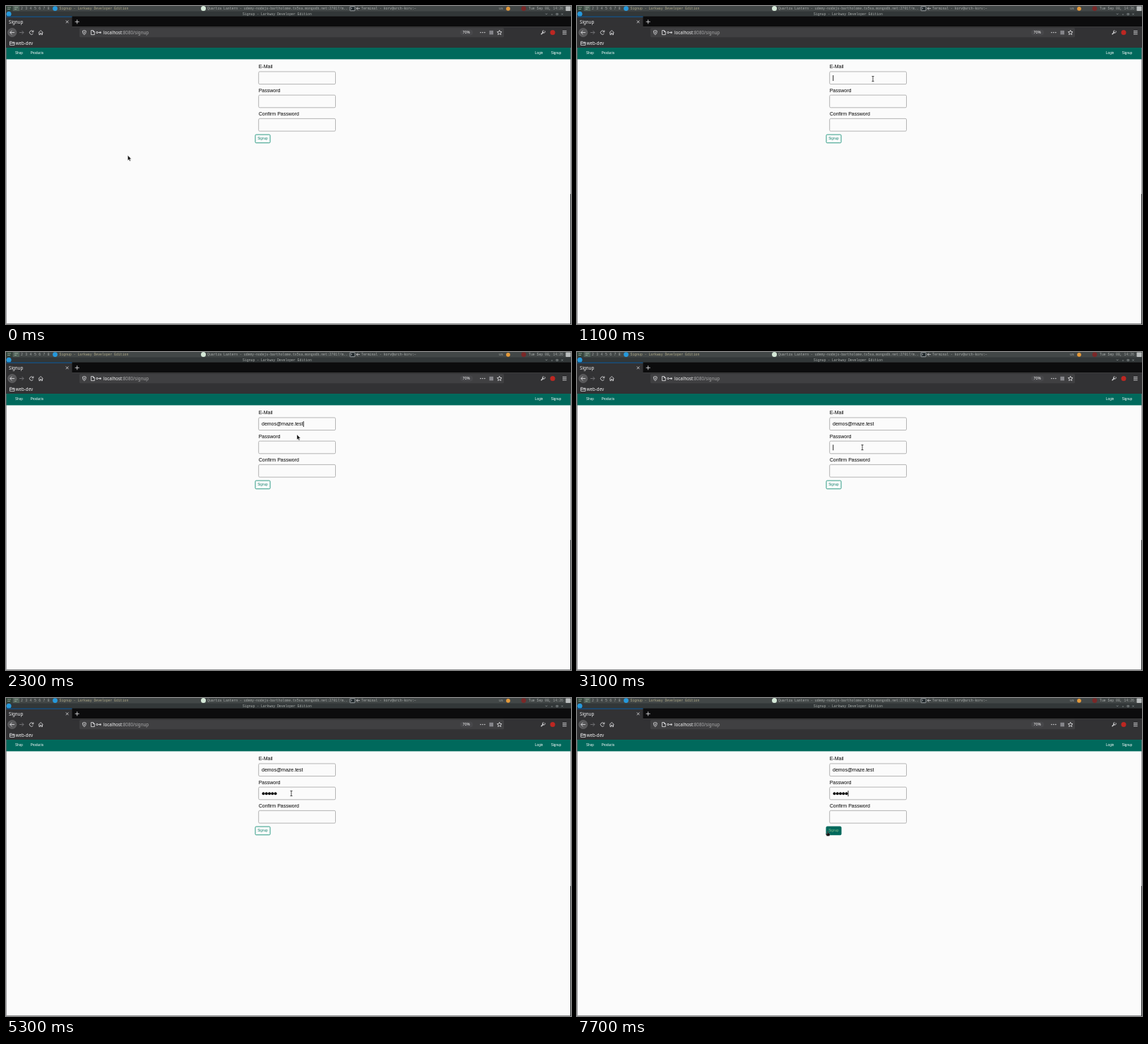
An HTML page that plays this animation: 800 px wide and 450 px high, repeating every 8000 ms.

```html
<!DOCTYPE html>
<html lang="en">
<head>
<meta charset="utf-8">
<title>Signup form</title>
<style>
  html, body { margin: 0; width: 100%; height: 100%; overflow: hidden; background: #fbfbfb; }
  svg { display: block; width: 800px; height: 450px; }
  text { white-space: pre; }
  .panel text { font: 4.8px "Liberation Mono", monospace; fill: #a9adab; }
  .panel .active { fill: #b0aa88; }
  .chrome text { font: 6.2px "Noto Sans", sans-serif; fill: #f4f4f5; }
  .nav text, .button text { font: 4.65px "Liberation Sans", sans-serif; fill: #fff; }
  .form text { font: 7px "Liberation Sans", sans-serif; fill: #000; }
  .form rect { fill: #fbfbfb; stroke: #adadad; stroke-width: .9; }
  .line { fill: none; stroke: #d5d5d7; stroke-width: .9; }
  .button rect { fill: #fbfbfb; stroke: #2f9c85; stroke-width: 1; }
  .button text { fill: #15836f; }
  .button.hover rect { fill: #00695c; stroke: #00695c; }
  .button.hover text { fill: #86bd8c; }
</style>
</head>
<body>
<svg viewBox="0 0 800 450">
  <rect width="800" height="450" fill="#fbfbfb"/>

  <g class="panel">
    <rect width="800" height="15" fill="#323738"/>
    <rect width="800" height="7.5" fill="#424747"/>
    <rect width="9" height="7" fill="#32443a"/>
    <rect x="10" width="9" height="7" fill="#52645a"/>
    <path d="M2 2H7M2 4.5H6M12 2H17M12 4.5H15" stroke="#a3b0a6" stroke-width=".8"/>
    <g id="workspaces"></g>
    <circle cx="69.5" cy="3.6" r="3.4" fill="#2599dc"/>
    <text class="active" x="75.5" y="5">Signup - Larkway Developer Edition</text>
    <circle cx="279.5" cy="3.6" r="3.5" fill="#d5e9d8"/>
    <text x="285" y="5">Quartza Lantern - udemy-nodejs-bartholome.tx5sa.mongodb.net:27017/m..</text>
    <rect x="487" y=".7" width="7" height="6" rx=".7" fill="#20282b" stroke="#c5cbcc" stroke-width=".7"/>
    <path d="M488.3 2.2L489.6 3.4L488.3 4.6" class="line"/>
    <path d="M496 3.5H501M498.5 1.5L496 3.5L498.5 5.5" class="line" style="stroke-width:.7"/>
    <text x="503" y="5">Terminal - korv@arch-korv:~</text>
    <text x="698" y="5">us</text>
    <circle cx="711" cy="3.8" r="2.9" fill="#e59a3a"/>
    <circle cx="733" cy="3.6" r="3.4" fill="#7a2828"/>
    <text x="740" y="5">Tue Sep 08, 14:26</text>
    <rect x="792.5" y=".5" width="7" height="6.5" rx=".8" fill="#b9bdbd"/>
    <circle cx="4" cy="11.3" r="3.5" fill="#2599dc"/>
    <text x="335" y="12.6">Signup - Larkway Developer Edition</text>
    <path d="M764 10.6L765.2 12L766.4 10.6M772 12H774M779 10.5H781.5V12.5H779ZM786.5 10.5L788.5 12.5M788.5 10.5L786.5 12.5" class="line" style="stroke:#979e9f;stroke-width:.7"/>
  </g>

  <g class="chrome">
    <rect y="14.7" width="800" height="15" fill="#0c0c0d"/>
    <rect y="15" width="93.5" height="15" fill="#323234"/>
    <rect y="14.7" width="93.5" height=".8" fill="#0a6fc4"/>
    <rect y="29.3" width="800" height="29.7" fill="#323234"/>
    <text x="4" y="24.5">Signup</text>
    <path class="line" d="M84.8 20.6L88.4 24.2M88.4 20.6L84.8 24.2M97.7 22.3H103.7M100.7 19.3V25.3"/>
    <circle cx="8.7" cy="37.5" r="6.1" fill="#58585a" stroke="#737375" stroke-width=".5"/>
    <path class="line" d="M12 37.5H5.8M8.4 34.8L5.7 37.5L8.4 40.2"/>
    <path class="line" style="stroke:#77777a" d="M19 37.5H25M22.5 35L25 37.5L22.5 40"/>
    <path class="line" d="M38.3 36A2.7 2.7 0 1 0 38.4 39M38.8 34.4V36.8H36.4"/>
    <path class="line" d="M45.8 37.8L49.2 34.6L52.6 37.8M46.9 37.5V40.6H48.3V38.5H50.1V40.6H51.5V37.5"/>
    <rect x="104" y="31" width="601" height="13.3" rx="1.5" fill="#404042"/>
    <path class="line" d="M108.4 35.3L110.8 34.5L113.2 35.3C113.2 38 112.6 39.6 110.8 40.6C109 39.6 108.4 38 108.4 35.3ZM110.8 36V39"/>
    <path class="line" d="M120.5 34.5H123.5L125.3 36.3V40.6H120.5ZM123.3 34.5V36.5H125.3"/>
    <path class="line" d="M130.3 37.5H134.5"/>
    <circle class="line" cx="129" cy="37.5" r="1.2"/><circle class="line" cx="133.5" cy="37.5" r="1"/>
    <text x="138" y="39.7">localhost<tspan fill="#a8a8aa">:8080/signup</tspan></text>
    <rect x="643" y="33.5" width="18" height="8" rx="4" fill="#48484b"/>
    <text x="646.5" y="39.4" style="font-size:5.2px">70%</text>
    <path d="M672 37.5H679" stroke="#d5d5d7" stroke-width="1.6" stroke-linecap="round" stroke-dasharray="0 2.9"/>
    <rect x="684.4" y="34.8" width="5.6" height="5.6" fill="#85858a"/>
    <path class="line" id="star"/>
    <path class="line" style="stroke-width:1.4" d="M757.6 40.2L761 36.8"/>
    <path class="line" d="M762.8 35.2A1.8 1.8 0 1 1 761.3 34.6"/>
    <circle cx="774" cy="37.6" r="3.5" fill="#bd2722"/>
    <path class="line" d="M788 35.4H793.7M788 37.6H793.7M788 39.8H793.7"/>
    <path class="line" d="M5.4 50.3H8L8.8 51.2H12V55.3H5.4ZM5.4 52.5H12"/>
    <text x="13.7" y="54.8">web-dev</text>
  </g>

  <g class="nav">
    <rect y="59" width="800" height="16.4" fill="#00695c"/>
    <text x="13" y="68.4">Shop</text>
    <text x="34.7" y="68.4">Products</text>
    <text x="749" y="68.4">Login</text>
    <text x="771.7" y="68.4">Signup</text>
  </g>

  <g class="form">
    <g id="fields"></g>
    <text id="email" x="362" y="104"></text>
    <g id="dots"></g>
  </g>
  <g class="button" id="button">
    <rect x="353" y="182" width="21" height="11.7" rx="1.2"/>
    <text x="356.2" y="189.4">Signup</text>
  </g>
  <rect id="caret" width=".9" height="8" fill="#111"/>

  <path d="M.3 59V449.6H799.6" fill="none" stroke="#6b6e70" stroke-width=".8"/>
  <path d="M799.6 59V266" stroke="#77797b" stroke-width=".8"/>
  <path d="M799.5 266V450" stroke="#25282a"/>

  <g id="pointer">
    <path id="arrow" d="M0 0V7L1.6 5.6L2.7 8L3.8 7.5L2.7 5.1H4.8Z" fill="#111" stroke="#ddd" stroke-width=".35"/>
    <path id="beam" d="M-1.5 -3.5H1.5M-1.5 3.5H1.5M0 -3.5V3.5" fill="none" stroke="#222" stroke-width=".8"/>
    <path id="hand" d="M-.6 -.3Q0 -1 .6 -.3V2.3L3 3V5L2.3 6.5H-1.3L-2.7 3.8L-1.9 3L-.6 4Z" fill="#111" stroke="#aaa" stroke-width=".3"/>
  </g>
</svg>

<script>
const LOOP = 8000, STEP = 100;
const EMAIL = "demos@maze.test";
const FIELDS = [["E-Mail", 92.9], ["Password", 126.1], ["Confirm Password", 159.4]];
const FIELD = { x: 357.7, w: 108.8, h: 17.7 };
const DOT = { x: 364.5, y: 135.2, gap: 4.25 };

// time, x, y of the pointer's hot spot
const PATH = [
  [0, 172.5, 211.5], [800, 419, 103],
  [1500, 419, 103], [1800, 413.5, 115],
  [1900, 413.5, 115], [2300, 412, 117],
  [2500, 412, 117], [2900, 404, 135],
  [5900, 404, 135], [6400, 344.7, 180.7], [6800, 355, 188.7],
];
const DOTS = [[0, 0], [3600, 1], [3900, 2], [4000, 3], [4200, 4], [5000, 5]];
const CARET = [[0, ""], [1100, "email"], [2600, ""], [2900, "password"], [5300, ""],
  [6000, "password"], [6700, ""], [7700, "password"]];

const $ = id => document.getElementById(id);
const add = (parent, tag, attrs, text = "") => {
  const node = document.createElementNS(parent.namespaceURI, tag);
  for (const key in attrs) node.setAttribute(key, attrs[key]);
  node.textContent = text;
  return parent.appendChild(node);
};
const show = (node, on) => node.setAttribute("visibility", on ? "visible" : "hidden");
const valueAt = (table, t) => table.filter(row => row[0] <= t).pop()[1];
const within = (x, y, left, top, w, h) => x >= left && x <= left + w && y >= top && y <= top + h;

for (let i = 2; i <= 8; i++) add($("workspaces"), "text", { x: 21 + (i - 2) * 6.3, y: 5 }, i);
for (const [label, y] of FIELDS) {
  add($("fields"), "text", { x: 357.7, y: y - 4.5 }, label);
  add($("fields"), "rect", { x: FIELD.x, y, width: FIELD.w, height: FIELD.h, rx: 1.5 });
}
const dots = Array.from({ length: 5 }, (_, i) =>
  add($("dots"), "circle", { cx: DOT.x + i * DOT.gap, cy: DOT.y, r: 1.95 }));
$("star").setAttribute("d", "M" + Array.from({ length: 10 }, (_, i) => {
  const r = i % 2 ? 1.6 : 3.5, a = i * Math.PI / 5;
  return [698.7 + r * Math.sin(a), 37.7 - r * Math.cos(a)].map(v => v.toFixed(2)).join(" ");
}).join("L") + "Z");

function pointerAt(t) {
  const next = PATH.findIndex(point => point[0] > t);
  if (next < 0) return PATH[PATH.length - 1].slice(1);
  const [t0, x0, y0] = PATH[next - 1], [t1, x1, y1] = PATH[next];
  const p = (t - t0) / (t1 - t0), ease = p * p * (3 - 2 * p);
  return [x0 + (x1 - x0) * ease, y0 + (y1 - y0) * ease];
}

function draw(t) {
  const [x, y] = pointerAt(t);
  const onField = FIELDS.some(([, top]) => within(x, y, FIELD.x, top, FIELD.w, FIELD.h));
  const onButton = within(x, y, 353, 182, 21, 12);
  $("pointer").setAttribute("transform", `translate(${x} ${y})`);
  show($("beam"), onField);
  show($("hand"), onButton);
  show($("arrow"), !onField && !onButton);
  $("button").classList.toggle("hover", onButton);

  const filled = t >= 2200;
  $("email").textContent = filled ? EMAIL : "";
  const count = valueAt(DOTS, t);
  dots.forEach((dot, i) => show(dot, i < count));

  const focus = valueAt(CARET, t);
  const inEmail = focus === "email";
  const width = inEmail ? (filled ? $("email").getComputedTextLength() : 0) : count * DOT.gap;
  $("caret").setAttribute("x", 362.3 + width);
  $("caret").setAttribute("y", inEmail ? 98 : 131.2);
  show($("caret"), focus);
}

function tick() {
  draw(Math.floor(performance.now() % LOOP / STEP) * STEP);
  requestAnimationFrame(tick);
}
tick();
</script>
</body>
</html>
```
